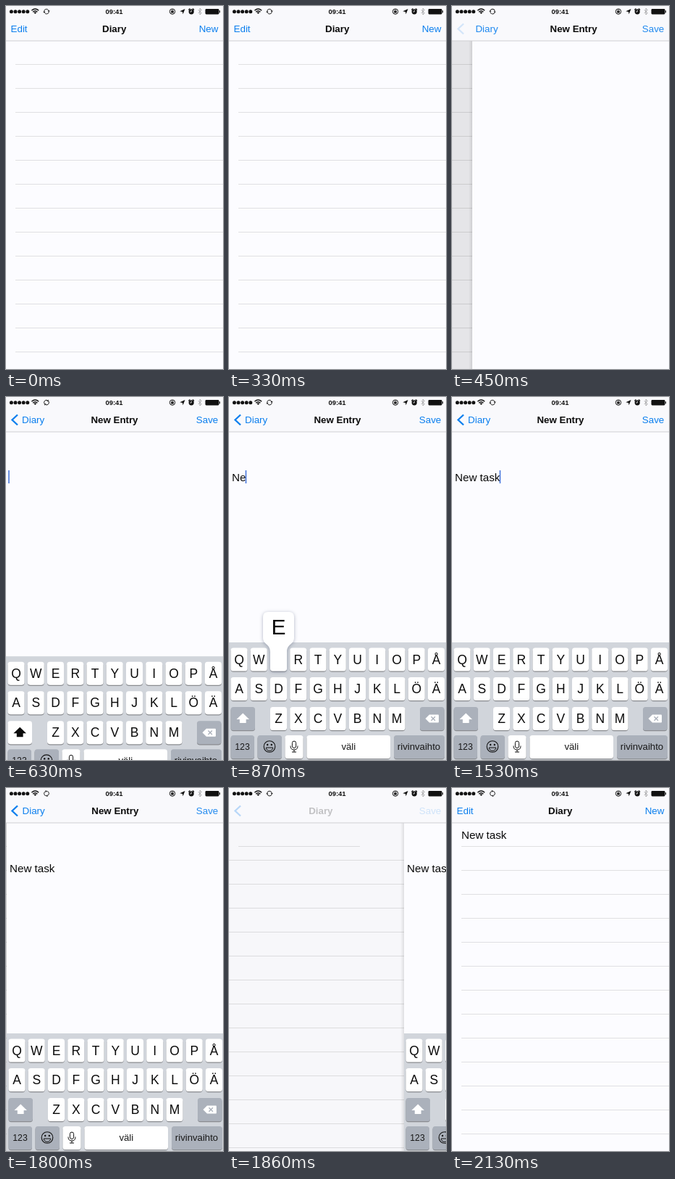
Recreate the animation shown at these times as an HTML page. Size 300 px wide and 500 px high, loop 2.16 s.

```html
<!DOCTYPE html>
<html lang="en">
<head>
<meta charset="utf-8">
<title>Diary</title>
<style>
  html, body { margin: 0; width: 100%; height: 100%; overflow: hidden; background: #fcfcff; }
  svg { display: block; width: 300px; height: 500px; }
  text { font-family: "Liberation Sans", Arial, sans-serif; white-space: pre; }
  .mid { text-anchor: middle; }
  .link { font-size: 13.4px; fill: #0c7fee; }
  .title { font-size: 13.3px; font-weight: bold; fill: #0a0a0a; }
  .body { font-size: 15.2px; fill: #0a0a0a; }
  .cap { font-size: 17.5px; fill: #0c0c0c; }
  .label { font-size: 13.2px; fill: #181818; }
  .pop { filter: drop-shadow(0 1px 2.5px rgba(80, 90, 120, .45)); }
  .line { fill: none; stroke: #111; }
</style>
</head>
<body>
<svg viewBox="0 0 300 500">
  <defs>
    <linearGradient id="edge">
      <stop offset="0" stop-color="#000" stop-opacity="0"/>
      <stop offset="1" stop-color="#000" stop-opacity=".1"/>
    </linearGradient>
  </defs>
  <rect width="300" height="500" fill="#fcfcff"/>

  <g id="list"></g>
  <rect id="newLine" x="13" y="80" height="1" fill="#e0e0e2"/>
  <text id="newRow" class="body" x="13" y="70">New task</text>
  <rect id="dim" width="300" height="500"/>

  <g id="edit">
    <rect x="-5" width="5" height="500" fill="url(#edge)"/>
    <rect width="300" height="500" fill="#fcfcff"/>
    <text id="entry" class="body" x="4" y="116"></text>
    <rect id="caret" y="101" width="1.6" height="18" fill="#4a78dc"/>
    <g id="board"></g>
  </g>

  <rect width="300" height="48" fill="#f9f9fc"/>
  <rect y="47.5" width="300" height="1" fill="#d0d0d4"/>
  <text id="editBtn" class="link" x="6.5" y="36">Edit</text>
  <text id="newBtn" class="link" x="293.5" y="36" text-anchor="end">New</text>
  <text id="listTitle" class="title mid" y="36">Diary</text>
  <text id="editTitle" class="title mid" y="36">New Entry</text>
  <text id="back" class="link" y="36">Diary</text>
  <path id="chevron" d="M16 24.5L8.5 31.5L16 38.5" fill="none" stroke="#0c7fee" stroke-width="2.3"/>
  <text id="saveBtn" class="link" x="293.3" y="36" text-anchor="end">Save</text>

  <g id="status">
    <path class="line" d="M7.4 7.7H30" stroke-width="5" stroke-linecap="round" stroke-dasharray="0 5.6"/>
    <g class="line" stroke-width="1.5">
      <path d="M35.4 6.2Q40.3 1.8 45.2 6.2M37.2 8.2Q40.3 5.4 43.4 8.2"/>
      <path d="M38.4 9L40.3 11L42.2 9Q40.3 7.6 38.4 9Z" fill="#111" stroke="none"/>
    </g>
    <g id="sync">
      <path class="line" d="M-3.3 -.5A3.3 3.3 0 0 1 2.7 -1.9M3.3 .5A3.3 3.3 0 0 1 -2.7 1.9" stroke-width=".9"/>
      <path d="M4.6 -1.6L3.2 .7L1.4 -1.4ZM-4.6 1.6L-3.2 -.7L-1.4 1.4Z" fill="#111"/>
    </g>
    <text class="mid" x="149.5" y="11" font-size="9.4" font-weight="bold" fill="#111">09:41</text>
    <g class="line" stroke-width="1">
      <circle cx="230" cy="7.6" r="3.7"/>
      <path d="M228.8 7V6.2Q230 4.6 231.2 6.2V7" stroke-width=".8"/>
      <rect x="228.2" y="6.8" width="3.6" height="2.7" fill="#111" stroke="none"/>
    </g>
    <path d="M247.5 4L244.6 11.3L243.9 8.1L240.3 7.3Z" fill="#111"/>
    <circle cx="256.2" cy="7.8" r="3.6" fill="#111"/>
    <path class="line" d="M252.4 5.4L254.4 3.6M260 5.4L258 3.6" stroke-width="1.4"/>
    <path d="M256.2 5.6V8H254.4" fill="none" stroke="#fff" stroke-width=".8"/>
    <path d="M265.8 5.2L270.4 9.8L268 12V3.2L270.4 5.4L265.8 10" fill="none" stroke="#a0a0a2" stroke-width=".9"/>
    <rect x="275.5" y="4" width="19" height="7.4" rx="1.4" fill="#111"/>
    <path d="M295 6.2H296V9.2H295Z" fill="#111"/>
  </g>
</svg>

<script>
const LOOP = 2160;
const PUSH = 370, RISE = 556, POP = 1799, INSERT_MS = 112;
const KEY_W = 23, KEY_H = 32, STEP = 27.25;
const GREY = '#abb1bb';
const $ = id => document.getElementById(id);
const clamp = v => Math.max(0, Math.min(1, v));
const set = (id, attrs) => {
  for (const name in attrs) $(id).setAttribute(name, attrs[name]);
};

// critically damped spring, 0 to 1
const spring = ms => {
  const a = ms * .049;
  return a <= 0 ? 0 : a > 7.5 ? 1 : 1 - (1 + a) * Math.exp(-a);
};
const easeInOut = v => (1 - Math.cos(Math.PI * clamp(v))) / 2;

// keyboard
const keys = {};
const keyRect = (x, y, w, fill, id = '') =>
  `<rect x="${x}" y="${y + 1.2}" width="${w}" height="${KEY_H}" rx="3.6" fill="#8a8c90"/>` +
  `<rect ${id && `id="${id}"`} x="${x}" y="${y}" width="${w}" height="${KEY_H}" rx="3.6" fill="${fill}"/>`;

const letters = (row, x0, y) => [...row].map((ch, i) => {
  const x = x0 + i * STEP;
  keys[ch] = { x, y };
  return keyRect(x - KEY_W / 2, y, KEY_W, '#fff') +
    `<text class="cap mid" x="${x}" y="${y + 22.3}">${ch}</text>`;
}).join('');

const label = (str, x, size = 13.2) =>
  `<text class="label mid" x="${x}" y="148" style="font-size:${size}px">${str}</text>`;

$('board').innerHTML =
  '<rect width="300" height="164" fill="#d1d5db"/>' +
  letters('QWERTYUIOPÅ', 14, 7.5) +
  letters('ASDFGHJKLÖÄ', 14, 48) +
  letters('ZXCVBNM', 68.5, 89) +
  keyRect(2.5, 89, 33.5, GREY, 'shift') +
  '<path id="arrow" d="M19.2 97.5L28 106H23.6V111H14.8V106H10.4Z"/>' +
  keyRect(264, 89, 33.5, GREY) +
  '<path d="M271.5 105L277 99.5H289Q290 99.5 290 100.5V109.5Q290 110.5 289 110.5H277Z" fill="#fff"/>' +
  `<path d="M279.5 102.2L285 107.8M285 102.2L279.5 107.8" stroke="${GREY}" stroke-width="1.4"/>` +
  keyRect(2.5, 128, 32.5, GREY) + label('123', 18.5, 12.2) +
  keyRect(39.5, 128, 33.5, GREY) +
  '<circle class="line" cx="56" cy="143.5" r="7.8" stroke-width="1.1"/>' +
  '<path class="line" d="M51.2 145H60.8Q60 149.3 56 149.3T51.2 145Z" stroke-width="1"/>' +
  '<circle cx="53.2" cy="141" r="1.2" fill="#111"/><circle cx="58.8" cy="141" r="1.2" fill="#111"/>' +
  keyRect(77.5, 128, 25, '#fff') +
  '<rect class="line" x="87.4" y="136" width="5.2" height="9.5" rx="2.6" stroke-width="1"/>' +
  '<path class="line" d="M85 142.5Q85 148 90 148T95 142.5M90 148V151M87 151H93" stroke-width="1"/>' +
  keyRect(107.5, 128, 115.5, '#fff', 'space') + label('väli', 165.3) +
  keyRect(228, 128, 70, GREY) + label('rivinvaihto', 262.5) +
  '<g id="pop" class="pop"><path id="bubble" fill="#fff"/><text id="big" class="mid" font-size="30" fill="#0c0c0c"></text></g>';

// list separators
const rows = Array.from({ length: 13 }, (_, i) => {
  const r = document.createElementNS('http://www.w3.org/2000/svg', 'rect');
  for (const [k, v] of Object.entries({ x: 13, width: 400, height: 1, fill: '#e0e0e2' })) r.setAttribute(k, v);
  $('list').append(r);
  return { r, y: 80 + 33 * i };
});

const TEXT = 'New task';
const TYPED = [755, 858, 970, 1090, 1190, 1285, 1370, 1450];

function drawPopup(ch) {
  const key = keys[ch];
  $('pop').style.display = key ? '' : 'none';
  if (!key) return;
  const { x, y } = key, c = Math.max(24, x);
  const l = c - 21.5, r = c + 21.5, kl = x - KEY_W / 2, kr = x + KEY_W / 2, b = y + KEY_H;
  set('bubble', { d:
    `M${l + 7} ${y - 49.5}H${r - 7}Q${r} ${y - 49.5} ${r} ${y - 42.5}V${y - 14}` +
    `C${r} ${y - 4} ${kr} ${y - 6} ${kr} ${y + 6}V${b - 4}Q${kr} ${b} ${kr - 4} ${b}` +
    `H${kl + 4}Q${kl} ${b} ${kl} ${b - 4}V${y + 6}` +
    `C${kl} ${y - 6} ${l} ${y - 4} ${l} ${y - 14}V${y - 42.5}Q${l} ${y - 49.5} ${l + 7} ${y - 49.5}Z` });
  set('big', { x: c, y: y - 18.3 });
  $('big').textContent = ch;
}

function drawTyping(t) {
  const count = TYPED.filter(at => t >= at).length;
  const str = TEXT.slice(0, count);
  if ($('entry').textContent !== str) $('entry').textContent = str;
  const width = count ? $('entry').getComputedTextLength() : 0;
  set('caret', { x: 3.2 + width, opacity: t >= RISE && t < POP ? 1 : 0 });

  const held = TYPED.findIndex(at => t >= at - 40 && t < at + 35);
  const ch = held < 0 ? '' : TEXT[held].toUpperCase();
  drawPopup(ch);
  set('space', { fill: ch === ' ' ? GREY : '#fff' });
  set('shift', { fill: count ? GREY : '#fff' });
  set('arrow', { fill: count ? '#fff' : '#0c0c0c' });
}

function drawList(t, p) {
  const q = easeInOut((t - POP) / INSERT_MS);
  for (const { r, y } of rows) r.setAttribute('y', Math.round(y + 33 * q));
  set('list', { transform: `translate(${-90 * p} 0)` });
  set('newLine', { width: Math.round(287 * q) });
  set('newRow', { opacity: clamp((q - .6) / .4) });
  set('dim', { opacity: .1 * p });
}

function drawNav(p, popping) {
  const fade = (id, v) => set(id, { opacity: clamp(v) });
  set('listTitle', { x: 149.7 - 118 * p });
  set('editTitle', { x: 150 + 193 * (1 - p) });
  set('back', { x: 22 + 111 * (1 - p) });
  fade('listTitle', 1 - 4 * p);
  fade('editTitle', (p - .3) / .6);
  fade('back', (p - .4) / .55);
  fade('chevron', popping ? p * 1.4 : (p - .89) / .1);
  fade('saveBtn', popping ? p * .9 : p);
  fade('editBtn', 1 - 6 * p);
  fade('newBtn', 1 - 6 * p);
}

function draw(t) {
  const popping = t >= POP;
  const p = popping ? 1 - spring(t - POP) : spring(t - PUSH);
  drawList(t, p);
  drawNav(p, popping);
  drawTyping(t);
  $('edit').style.display = p > 0 ? '' : 'none';
  set('edit', { transform: `translate(${Math.round(300 * (1 - p))} 0)` });
  set('board', { transform: `translate(0 ${500 - 162 * spring(t - RISE)})` });
  set('sync', { transform: `translate(56 7.6) rotate(${t * 1.65})` });
}

const start = performance.now();
function tick() {
  draw((performance.now() - start) % LOOP);
  requestAnimationFrame(tick);
}
tick();
</script>
</body>
</html>
```
